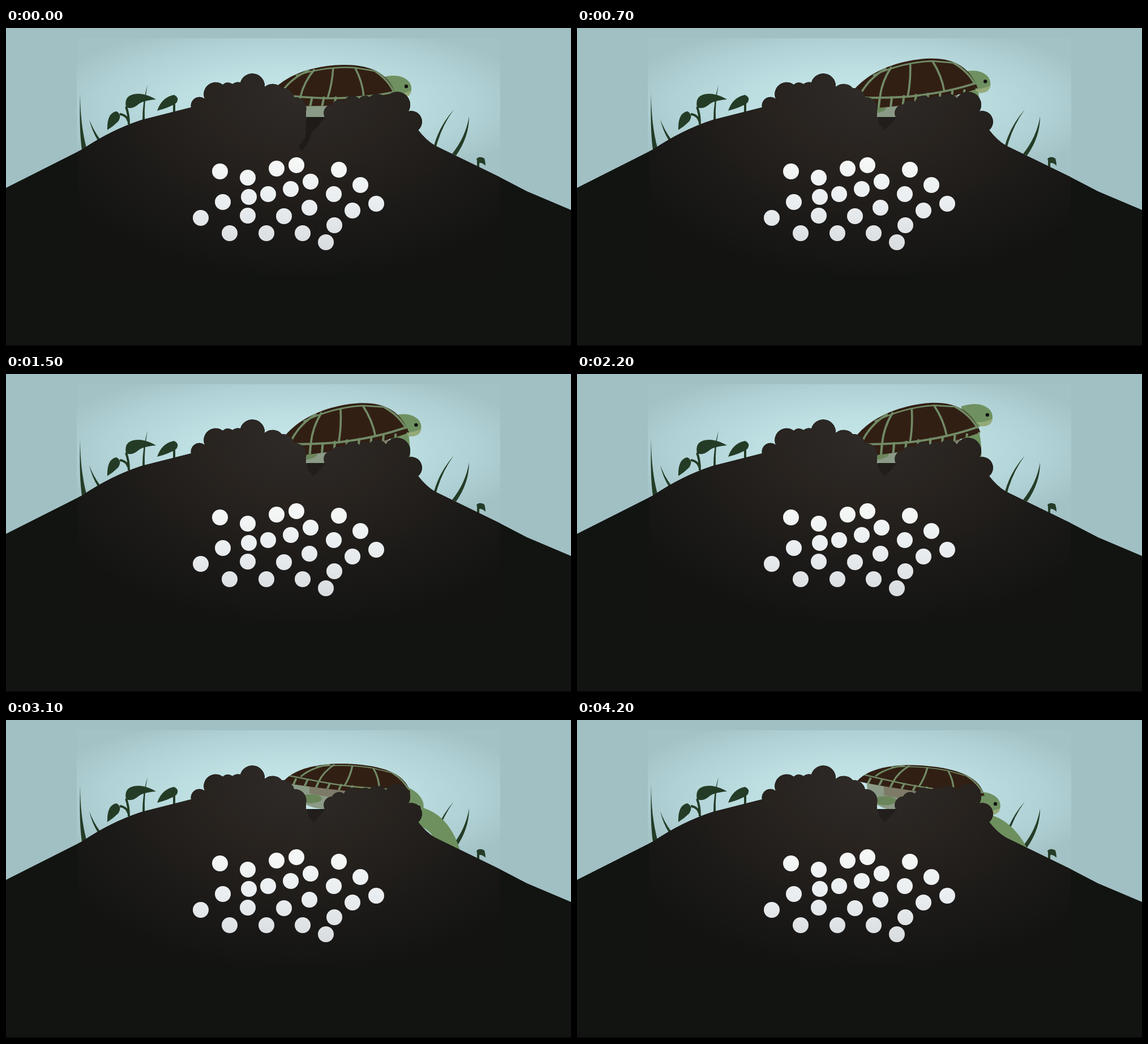
Recreate the animation shown at these times as an HTML page. Size 998 by 561 pixels, loop 4300 ms.

```html
<!DOCTYPE html>
<html lang="en">
<head>
<meta charset="utf-8">
<title>Turtle nest</title>
<style>
html, body { margin: 0; width: 100%; height: 100%; overflow: hidden; background: #121411; }
svg { display: block; width: 998px; height: 561px; }
</style>
</head>
<body>
<svg viewBox="0 0 998 561">
  <defs>
    <radialGradient id="sky" gradientUnits="userSpaceOnUse" cx="0" cy="0" r="1" gradientTransform="translate(500 135) scale(440 150)">
      <stop offset="0" stop-color="#c6e8ea"/><stop offset=".4" stop-color="#bee0e3"/>
      <stop offset=".75" stop-color="#b0d1d5"/><stop offset="1" stop-color="#a3c2c6"/>
    </radialGradient>
    <radialGradient id="soil" gradientUnits="userSpaceOnUse" cx="0" cy="0" r="1" gradientTransform="translate(520 110) scale(500 335)">
      <stop offset="0" stop-color="#2f2b28"/><stop offset=".35" stop-color="#28231f"/>
      <stop offset=".7" stop-color="#1c1a18"/><stop offset="1" stop-color="#131412"/>
    </radialGradient>
    <linearGradient id="egg" gradientUnits="userSpaceOnUse" x1="0" y1="230" x2="0" y2="392">
      <stop offset="0" stop-color="#f6f8f6"/><stop offset=".5" stop-color="#e9edf0"/><stop offset="1" stop-color="#d9dcde"/>
    </linearGradient>
    <clipPath id="window"><rect x="127" width="745" height="437"/></clipPath>
    <clipPath id="shellClip"><use href="#shellShape"/></clipPath>
    <path id="ground" d="M0 282L135 214Q185 180 240 162L327 140
      A15 15 0 0 1 351 125A21 21 0 0 1 383 100A13 13 0 0 1 400 99A16 16 0 0 1 414 96A22 22 0 0 1 457 104
      A21 21 0 0 1 487 106A21 21 0 0 1 509 122A20 20 0 0 1 530 146V157H563
      A15 15 0 0 1 576 135A14 14 0 0 1 597 130A16 16 0 0 1 624 125A13 13 0 0 1 642 122
      A19 19 0 0 1 671 124A22 22 0 0 1 711 147A19 19 0 0 1 728 180
      Q742 198 757 207L870 262 920 288 998 321V561H0Z"/>
  </defs>

  <rect width="998" height="561" fill="#a1c0c4"/>
  <rect x="125" y="18" width="748" height="382" fill="url(#sky)"/>

  <g fill="#243c26">
    <path d="M131 115Q129 180 134 215L142 211Q131 170 131 115ZM147 161Q152 182 162 198L166 196Q154 180 147 161ZM250 100Q241 130 241 163L245 161Q244 130 250 100Z"/>
    <path d="M212 140Q207 116 235 116 250 117 265 126 240 128 232 136 222 144 212 140ZM179 180Q178 150 195 147 206 153 198 165 190 173 179 180ZM267 146Q275 122 297 118 307 123 301 132 290 140 267 146Z"/>
    <path d="M791 144Q766 172 756 207L760 209Q770 172 791 144ZM818 156Q812 192 788 222L795 225Q818 192 818 156Z"/>
    <path d="M831 231Q836 225 845 230 847 237 847 243 840 236 834 239Z"/>
    <path d="M217 170Q217 152 212 139M217 166Q213 153 201 152M297 130V149M834 232V245" fill="none" stroke="#243c26" stroke-width="4"/>
  </g>

  <path id="arm" fill="none" stroke="#6d905e" stroke-width="32" stroke-linecap="round"/>
  <g id="head">
    <path d="M-46 -15C-30 -20 -17 -20 -9 -17 4 -13 10 -4 9 6 8 16 0 21 -12 20L-40 32Z" fill="#6f9161"/>
    <path d="M9 7C8 17 0 21 -12 20L-20 13Q-4 14 9 7Z" fill="#94aa79"/>
    <circle r="3.2" fill="#10140f"/>
  </g>
  <g id="belly">
    <path d="M-100 -10C-100 34 -60 40 -10 40L80 36V-10Z" fill="#8a9a86"/>
    <path d="M-70 -10V10Q-20 24 80 14V-10Z" fill="#7d7a68"/>
    <ellipse cx="-68" cy="20" rx="20" ry="8" fill="#6a855a"/>
  </g>
  <g id="shell">
    <path id="shellShape" d="M-122 16C-108 -20 -60 -53 18 -55 72 -56 103 -38 114 2Q60 14 -5 17 -60 19 -122 16Z" fill="#321f14"/>
    <g clip-path="url(#shellClip)" fill="none" stroke="#718b66" stroke-width="3.5">
      <path d="M-118 -5Q-50 3 -8 4 60 4 114 -8"/>
      <path d="M-40 -46Q-75 -30 -90 -5M-31 -47Q-50 -25 -56 2M2 -50Q0 -20 -8 4M41 -49Q54 -25 56 2M76 -44Q100 -28 110 -5"/>
      <path d="M-64 -36Q-10 -53 40 -50L76 -44" stroke-width="2.5"/>
      <path id="rim" stroke-width="4"/>
    </g>
  </g>

  <use href="#ground" fill="#121411"/>
  <use href="#ground" fill="url(#soil)" clip-path="url(#window)"/>
  <path d="M531 157H565L551 173 543 181 534 170Z" fill="#211e1b"/>
  <path id="crack" d="M531 157H560L551 173 540 184 534 202 524 216 516 210 529 192Z" fill="#1e1b18"/>
  <path d="M378 253h0M427 264h0M478 248h0M513 242h0M588 250h0M538 271h0M626 277h0M503 284h0M463 293h0M429 298h0M579 293h0M383 307h0
    M654 310h0M536 317h0M612 322h0M427 331h0M491 332h0M344 335h0M580 348h0M395 362h0M460 362h0M524 362h0M565 378h0"
    stroke="url(#egg)" stroke-width="28" stroke-linecap="round"/>
  <rect y="560" width="998" height="1" fill="#000"/>
</svg>
<script>
const LOOP = 4300, STEP = 100;
const $ = id => document.getElementById(id);
const place = (id, x, y, angle, sx = 1, sy = 1) =>
  $(id).setAttribute('transform', `translate(${x} ${y}) rotate(${angle}) scale(${sx} ${sy})`);

// Smooth 0..1 ramp between two times
function ramp(t, from, to) {
  const u = Math.min(1, Math.max(0, (t - from) / (to - from)));
  return u * u * (3 - 2 * u);
}

$('rim').setAttribute('d', Array.from({ length: 11 }, (_, i) => `M${-98 + i * 21} 1l-4 18`).join(''));

function draw() {
  const t = Math.floor(performance.now() % LOOP / STEP) * STEP;
  const rise = 1 - Math.exp(-t / 450);    // climbing out of the hole
  const lift = ramp(t, 1300, 2200);       // raising the head
  const drop = ramp(t, 2400, 3100);       // body sinks forward
  const nod = ramp(t, 2480, 3100);        // head follows
  const swing = ramp(t, 2300, 2900);      // arm reaches over the mound
  const settle = ramp(t, 3100, 4000);     // pulling back
  const arc = Math.sin(Math.PI * swing);

  const x = 576 + 20 * rise + 10 * drop + 6 * settle;
  const y = 120 - 5 * rise - drop + 2 * settle;
  const angle = -7 * rise + 14 * drop + 2 * settle;
  place('shell', x, y, angle, 1 + .03 * rise - .07 * drop, 1 + .1 * rise - .42 * drop - .02 * settle);
  place('belly', x, y + Math.max(0, angle) * .7, Math.min(0, angle));
  place('head', 707 + 18 * rise + 4 * nod + 10 * settle, 103 - 11 * rise - 20 * lift + 82 * nod - 6 * settle, 35 * nod - 31 * settle);

  const shoulder = [680 + 15 * rise + 27 * swing - 7 * settle, 115 - 9 * rise + 62 * swing - 10 * arc + 12 * settle];
  const elbow = [684 + 16 * rise + 67 * swing - 12 * settle, 135 - 5 * rise + 45 * swing - 27 * arc + 11 * settle];
  const hand = [682 + 16 * rise + 88 * swing - 6 * settle, 155 + 77 * swing - 12 * arc];
  $('arm').setAttribute('d', `M${shoulder}Q${elbow} ${hand}`);

  $('crack').style.display = t < 700 ? '' : 'none';
  requestAnimationFrame(draw);
}
draw();
</script>
</body>
</html>
```
